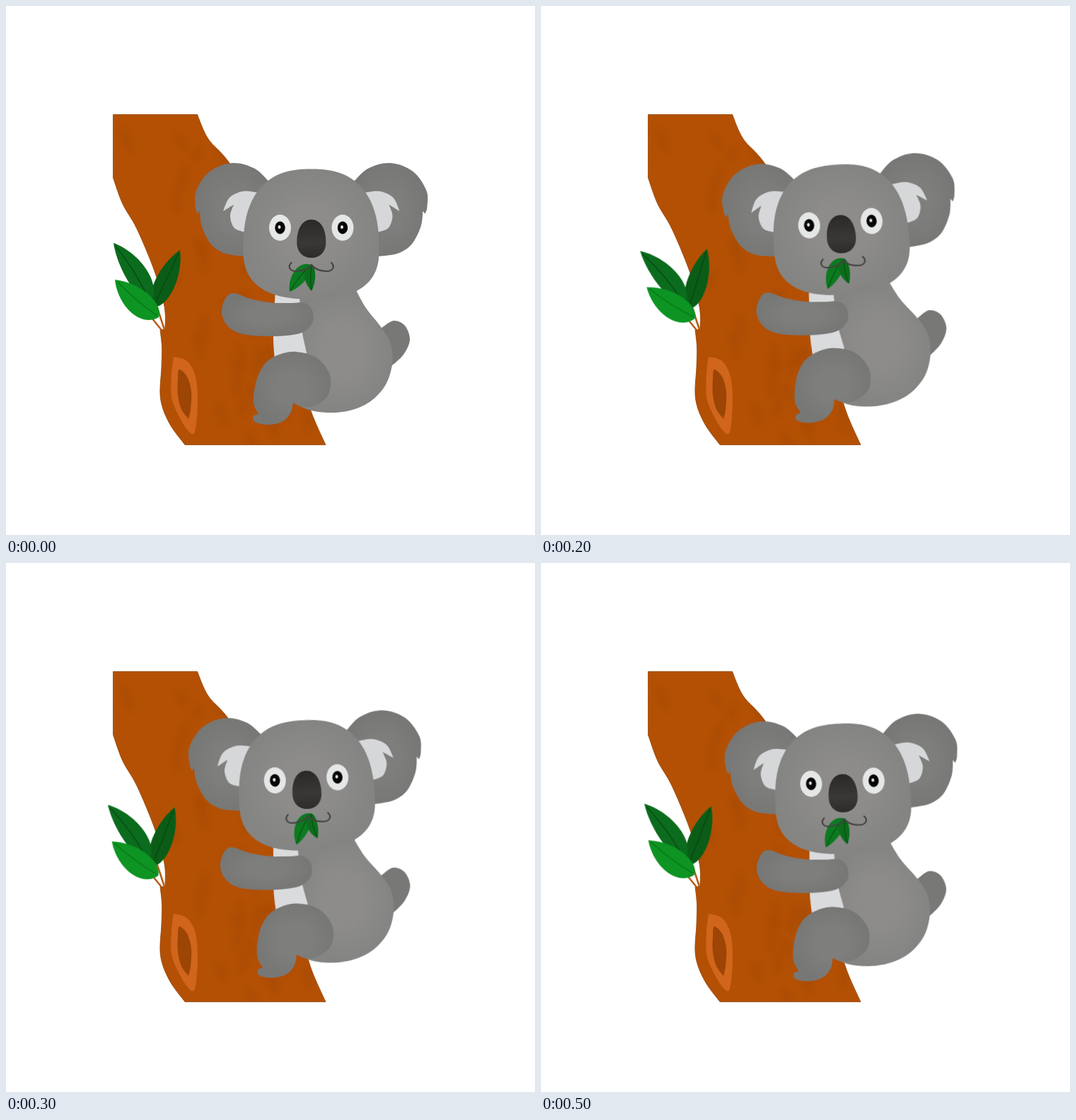
An HTML page for the animation above (600 ms loop, 748 by 748 pixels).

```html
<!DOCTYPE html>
<html lang="en">
<head>
<meta charset="utf-8">
<title>Koala on a tree</title>
<style>
  html, body { margin: 0; width: 100%; height: 100%; overflow: hidden; background: #fff; }
  svg { display: block; width: 100vw; height: 100vh; }
  #koala, #arm, #sprig, #snack { transform-box: view-box; }
</style>
</head>
<body>
<svg viewBox="0 0 748 748">
  <defs>
    <filter id="soft" x="-50%" y="-100%" width="200%" height="300%"><feGaussianBlur stdDeviation="4"/></filter>
    <radialGradient id="fur"><stop offset=".4" stop-color="#8d8c8a"/><stop offset="1" stop-color="#848483"/></radialGradient>
    <radialGradient id="dark"><stop offset=".4" stop-color="#7e7e7d"/><stop offset="1" stop-color="#777776"/></radialGradient>
    <linearGradient id="coal" x2="0" y2="1"><stop offset="0" stop-color="#2a2928"/><stop offset=".6" stop-color="#393836"/><stop offset="1" stop-color="#2d2c2b"/></linearGradient>
    <clipPath id="bark"><use href="#trunk"/></clipPath>
  </defs>
  <g id="tree"></g>
  <g id="sprig"></g>
  <g id="koala"></g>
  <g id="arm"></g>
</svg>
<script>
  const $ = id => document.getElementById(id);
  const { sin, cos, abs, sign, PI } = Math;

  // Closed smooth curve through "x,y" key points; "!" marks a corner
  function curve(text) {
    const pts = text.split(' ').flatMap(s => {
      const p = s.replace('!', '').split(',').map(Number);
      return s.endsWith('!') ? [p, p] : [p];
    });
    const at = i => pts[(i + pts.length) % pts.length];
    let d = 'M' + pts[0];
    pts.forEach((p, i) => {
      const q = at(i + 1);
      if (p === q) return;
      const c1 = p.map((v, k) => v + (q[k] - at(i - 1)[k]) / 6);
      const c2 = q.map((v, k) => v - (at(i + 2)[k] - p[k]) / 6);
      d += `C${c1} ${c2} ${q}`;
    });
    return d + 'Z';
  }

  // Superellipse with different heights above and below its widest line
  function egg(cx, cy, rx, up, down, n) {
    const pow = v => sign(v) * abs(v) ** (2 / n);
    const pts = Array.from({ length: 90 }, (_, i) => {
      const a = i * PI / 45, y = pow(sin(a));
      return [cx + rx * pow(cos(a)), cy + y * (y < 0 ? up : down)].map(v => v.toFixed(2));
    });
    return `M${pts.join('L')}Z`;
  }

  const fill = (d, color, more = '') => `<path d="${d}" fill="${color}" ${more}/>`;
  const shape = (text, color, more) => fill(curve(text), color, more);
  const line = (d, color, width) =>
    `<path d="${d}" fill="none" stroke="${color}" stroke-width="${width}" stroke-linecap="round"/>`;
  const mirrored = art => art + `<g transform="matrix(-1 0 0 1 863.5 0)">${art}</g>`;

  // Leaf from tip to base; a and b bulge to either side
  function leaf([x, y], [bx, by], a, b, color, rib) {
    const dx = bx - x, dy = by - y, len = Math.hypot(dx, dy);
    const at = (t, w) => [x + dx * t + dy / len * w, y + dy * t - dx / len * w];
    return fill(`M${x},${y}C${at(.35, a)} ${at(.9, a)} ${bx},${by}C${at(.9, b)} ${at(.35, b)} ${x},${y}Z`, color) +
      line(`M${at(.06, 0)}Q${at(.5, (a + b) / 2)} ${at(.95, 0)}`, rib, 1.2);
  }

  // Seeded soft marks on the bark
  let seed = 7;
  const rand = (lo, hi) => {
    seed = seed * 16807 % 2147483647;
    return lo + (hi - lo) * seed / 2147483647;
  };
  let marks = '';
  for (let i = 0; i < 45; i++) {
    const y = rand(155, 620), x = 110 + y * .32 + rand(0, 190);
    marks += `<ellipse rx="${rand(12, 26)}" ry="5" transform="translate(${x} ${y}) rotate(${rand(55, 110)})"/>`;
  }

  $('tree').innerHTML =
    shape('151.5,153.5! 270.5,153.5! 286,188 316,222 365,300 405,380 413,460 422,535 432,575 452,620.5! ' +
      '253,620.5! 231,590 218.5,555 220,510 220.5,482 218,458! 225,457! 224,425 210,375 185,315 165,280 151.5,243!',
      '#b35004', 'id="trunk" stroke="#954303" stroke-width=".8"') +
    `<g clip-path="url(#bark)"><g fill="#8f3f05" opacity=".2" filter="url(#soft)">${marks}</g></g>` +
    shape('237,496! 256,502 268,524 271,560 267,602 257,600 242,575 234,552 234,520', '#d0651b') +
    shape('245,514 256,524 262,545 261,570 258,584! 248,570 243,550 243,528', '#9c4504') +
    line('M206 441L219 457M213 424L223.5 456', '#b85a14', 2.5);

  $('sprig').innerHTML =
    leaf([246, 345], [208, 426], 20, -18, '#0a5c17', '#06450f') +
    leaf([152, 335], [204, 418], 26, -15, '#0b6c1e', '#06450f') +
    leaf([154, 387], [216, 440], 20, -27, '#0d9422', '#08701a');

  const ear =
    shape('375,252! 352,230 320,222 288,234 269,261 268,284 271,294! 274,290! 277,312 290,337 310,350 337,354! 380,300!', 'url(#dark)') +
    shape('358,264! 335,262 316,271 307,290! 322,281! 317,297 323,314 339,320! 350,295!', '#d5d7d8');

  const eye = x => [[0, 15.5, 18.5, '#e5e6e6'], [0, 7.2, 9, '#050505'], [-1, 2, 2.6, '#e5e6e6']]
    .map(([shift, rx, ry, color]) =>
      `<ellipse cx="${x + shift}" cy="${313.5 + shift}" rx="${rx}" ry="${ry}" fill="${color}"/>`).join('');

  $('koala').innerHTML =
    shape('530,456! 548,445 564,452 571,472 562,493 545,509!', '#787877') +
    shape('381,400! 420,400! 428,500! 380,500! 378,465', '#d9dbdc') +
    shape('415,400! 494,400! 509,427 531,455 544,478 546,507 536,537 514,560 486,572 455,575 425,570 404,558! 425,490! 417,450', 'url(#fur)') +
    shape('411,489 440,498 458,522 456,549 438,564 420,567 406,561! 402,576 390,588 370,592 352,588 350,580 357,577! 350,560 354,530 366,506 386,493', 'url(#dark)') +
    mirrored(ear) +
    fill(egg(431.5, 345, 96, 114.5, 69.5, 2.5), 'url(#fur)') +
    eye(387.5) + eye(476) +
    fill(egg(431.8, 334, 20.5, 32, 22, 2.2), 'url(#coal)') +
    '<g id="snack">' +
      leaf([401, 404], [431, 366], 17, -10, '#0c7a20', '#07500f') +
      leaf([432, 403], [432, 366], 13, -7, '#0b6d1c', '#07500f') +
    '</g>' +
    mirrored(line('M431.75 366Q424 375 410 375C401 375 398 368 403.5 363', '#434342', 2.2));

  $('arm').innerHTML =
    shape('322,406 346,414 375,419.5 405,420 422,420 433,430 433,449 415,463 375,467 335,464 314,453 305,434 310,414', 'url(#dark)');

  // p climbs from 0 to 1 and back in thirds; each part follows from it
  function pose(p) {
    const sway = sin(2.35 * p), lift = sin(1.2 * p), pull = p ** 4;
    return {
      koala: [-6.3 * sway - 3 * lift, -8.9 * lift, -4 * sway],
      snack: [4 * pull, -4 * lift, -12 * p],
      arm: [-2 * pull, -4 * pull, -lift],
      sprig: [-2 * pull, 1.5 * pull, -8 * sway ** 2]
    };
  }
  const pivots = { koala: [431.75, 313.5], snack: [432, 367], arm: [325, 435], sprig: [226, 422] };

  for (const id in pivots) {
    const frames = [];
    for (let k = 0; k <= 6; k++) {
      const [x, y, turn] = pose(1 - abs(k - 3) / 3)[id];
      frames.push({ transform: `translate(${x}px, ${y}px) rotate(${turn}deg)`, easing: 'step-end' });
    }
    $(id).style.transformOrigin = pivots[id].map(v => v + 'px').join(' ');
    $(id).animate(frames, { duration: 600, iterations: Infinity });
  }
</script>
</body>
</html>
```
